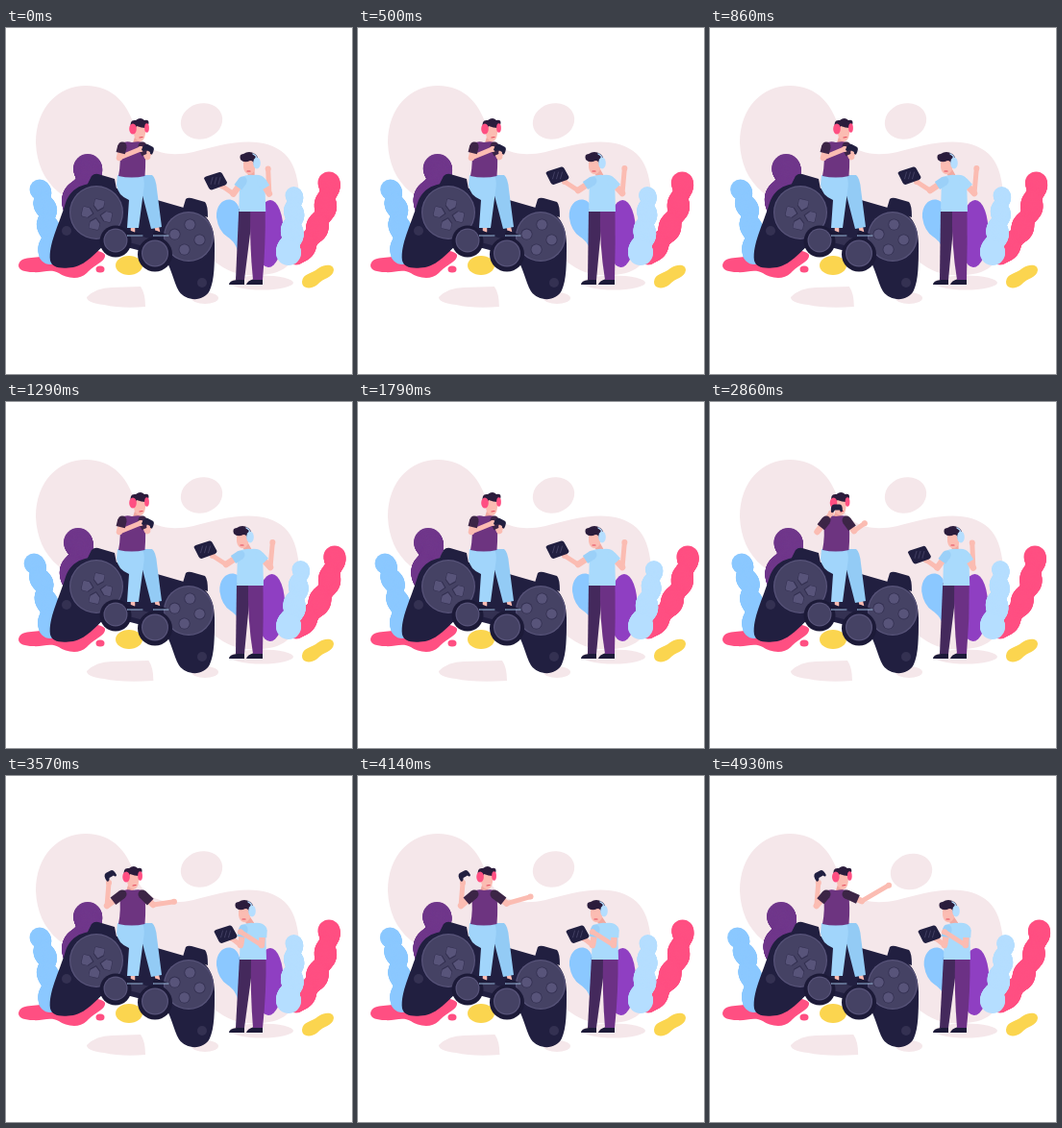
An HTML page with a canvas that plays this animation: 360x360 px, repeating every 5 s.

```html
<!DOCTYPE html>
<html lang="en">
<head>
<meta charset="utf-8">
<title>Gaming friends</title>
<style>
  html, body { margin: 0; width: 100%; height: 100%; overflow: hidden; background: #fff; }
  canvas { display: block; width: 100vmin; height: 100vmin; }
</style>
</head>
<body>
<canvas id="stage" width="360" height="360"></canvas>
<script>
const ctx = document.getElementById('stage').getContext('2d');
const LOOP = 5000, STEPS = 70, SWAY = 3500, TAU = Math.PI * 2;
const C = {
  blush: '#f5e7ea', skin: '#fbbcb2', neck: '#f2a9a0', pink: '#ff4f82', sky: '#8bc8ff',
  pale: '#b5deff', plum: '#70378b', violet: '#8f3fc2', yellow: '#fbd54f', ink: '#211f40',
  pad: '#454264', rim: '#58547a', jeans: '#a1d5fb', jeansFar: '#93cbf5', shirt: '#6d3480',
  sleeve: '#3c2546', hair: '#2b1c3c', tee: '#a9dafc', dark: '#44295c', trousers: '#6c3185',
  red: '#e4475a'
};

const mix = (a, b, k) => a + (b - a) * k;
const polar = ([x, y], r, angle) => [x + r * Math.cos(angle), y + r * Math.sin(angle)];
function ramp(t, from, to) {
  const u = Math.min(1, Math.max(0, (t - from) / (to - from)));
  return u * u * (3 - 2 * u);
}

function shape(d, color) {
  ctx.fillStyle = color;
  ctx.fill(new Path2D(d));
}
function oval(x, y, rx, ry, color, turn = 0) {
  ctx.fillStyle = color;
  ctx.beginPath();
  ctx.ellipse(x, y, rx, ry, turn, 0, TAU);
  ctx.fill();
}
function line(points, width, color, cap = 'round') {
  ctx.strokeStyle = color;
  ctx.lineWidth = width;
  ctx.lineCap = cap;
  ctx.lineJoin = 'round';
  ctx.beginPath();
  points.forEach(([x, y]) => ctx.lineTo(x, y));
  ctx.stroke();
}
function at(x, y, turn, draw) {
  ctx.save();
  ctx.translate(x, y);
  ctx.rotate(turn);
  draw();
  ctx.restore();
}

// Beaded plant: a curve from the swaying tip to a fixed base with a pulsing radius.
function stalk(tip, bend, base, { r0, r1, pulse, beads, shift, color }) {
  const n = 80;
  for (let i = 0; i <= n; i++) {
    const u = i / n, v = 1 - u, turn = u * beads * TAU;
    const [x, y] = [0, 1].map(k => tip[k] * v * v + 2 * bend[k] * u * v + base[k] * u * u);
    const r = mix(r0, r1, u) - pulse * (1 - Math.cos(turn));
    oval(x + shift * v + pulse * Math.sin(turn), y, r, r, color);
  }
}

function backdrop(t, sway) {
  shape('M31 120C31 82 55 60 83 60C112 60 126 80 133 100C143 130 167 135 195 129C225 121 266 109 290 131C308 148 306 185 305 215C303 250 285 259 250 257C222 255 208 232 170 205C130 187 82 192 55 171C39 158 32 140 31 120Z', C.blush);
  const drift = ramp(t, 4140, 4930);
  oval(203.5 + 6 * drift, 97 + 2.5 * drift, 22, 18.5, C.blush, -0.3);

  const right = 150 - 5 * sway;
  shape(`M84 280Q94 270 110 270L${right - 5} 269Q${right} 276 ${right} 290Q120 292 102 288Q84 286 84 280Z`, C.blush);
  oval(266, 265, 33, 7.5, C.blush);
  oval(207, 281, 14, 6, C.blush);

  shape('M13 247C15 236 30 241 45 236C60 230 100 228 103 236C104 243 92 246 84 255C76 263 62 260 55 255C46 250 38 255 28 254C20 254 13 252 13 247Z', C.pink);
  oval(98, 251, 4.5, 3.5, C.pink);
  oval(128, 247, 14, 10, C.yellow);
  shape('M308 264C309 255 318 256 325 250C333 245 341 246 341 252C340 260 330 260 324 267C318 272 308 272 308 264Z', C.yellow);

  const lean = 1 - sway;
  stalk([35, 168], [45, 192], [46, 234],
    { r0: 10.5, r1: 12, pulse: 1.5, beads: 3, shift: -3.5 * lean, color: C.sky });
  stalk([85, 146], [78, 165], [71, 190],
    { r0: 15, r1: 15, pulse: 3, beads: 1.2, shift: -6 * lean, color: C.plum });
  at(2 * lean, 0, 0, () =>
    shape('M219 197C218 177 237 173 242 186C248 200 246 220 242 236C240 226 237 222 230 217Q221 211 219 197Z', C.sky));
  oval(274 + lean, 214, 14.5, 35, C.violet, 0.03);
  stalk([336, 161], [334, 205], [302, 237],
    { r0: 11.5, r1: 12, pulse: 1.2, beads: 3.5, shift: 3.5 * lean, color: C.pink });
  stalk([299.5, 174], [301, 200], [294, 234],
    { r0: 9, r1: 13, pulse: 1.2, beads: 3, shift: 4.2 * lean, color: C.pale });
}

function disc(x, y, r) {
  oval(x, y, r, r, C.rim);
  oval(x, y, r - 1.2, r - 1.2, C.pad);
}

function gamepad() {
  shape('M84 164L89 154Q92 151 96 152L113 157L116 173ZM184 188L187 178Q189 176 193 177L207 181Q210 184 210 197Z', C.ink);
  shape('M46 242C44 225 55 205 62 182C69 163 85 160 102 163L185 187C206 188 217 202 217 225C217 245 217 262 212 273C206 285 188 285 180 274C174 264 172 248 164 238L106 223C96 230 85 246 70 249C55 251 48 249 46 242Z', C.ink);
  disc(94, 192, 28);
  disc(190, 217, 26);
  for (let i = 0; i < 4; i++) {
    const angle = i * TAU / 4 + 0.22;
    at(94.5, 194, angle, () => {
      shape('M-5.5 -14Q-5.5 -16 -3.5 -16H3.5Q5.5 -16 5.5 -14V-8L0 -3L-5.5 -8Z', '#343152');
      shape('M-5 -14Q-5 -15.5 -3 -15.5H4Q5 -15.5 5 -14V-9L0 -4.5L-5 -9Z', C.rim);
    });
    const [x, y] = polar([188.5, 217.5], 13.3, angle);
    oval(x, y, 6, 6, '#343152');
    oval(x, y, 5.2, 5.2, C.rim);
  }
  shape('M119 211L153 220L151 229L120 221Z', '#343152');
  for (const [x, y, r] of [[114, 222, 16.5], [155, 235.5, 18]]) {
    oval(x, y, r, r, '#1c1a38');
    disc(x, y - 1, r - 4);
  }
  oval(204, 265, 5, 5, '#343152');
  oval(63, 211, 5, 5, '#343152');
}

function limb(shoulder, elbow, hand, cloth, reach) {
  const cuff = shoulder.map((v, i) => mix(v, elbow[i], reach));
  line([shoulder, elbow], 6.5, C.skin);
  line([elbow, hand], 5, C.skin);
  line([shoulder, cuff], 9.5, cloth, 'butt');
  oval(...shoulder, 4.5, 4.5, cloth);
  oval(...hand, 3, 3, C.skin);
}

function sitter(t) {
  const cheer = ramp(t, 2430, 3290), stretch = ramp(t, 3400, 5100);

  line([[132, 204], [132, 212]], 4.5, C.skin);
  line([[156, 204], [158, 212]], 4.5, C.skin);
  for (const x of [126, 153]) {
    shape(`M${x} 216Q${x} 210 ${x + 4} 211L${x + 16} 215.5Z`, '#1c1a38');
    line([[x, 216], [x + 16, 216]], 0.8, C.pale);
  }
  shape('M132 153H152Q156 156 157 168L162 207L151 209L142 174Z', C.jeansFar);
  shape('M116 153H142Q145 160 143 170L138 208H126L128 179Q116 174 115 163Z', C.jeans);

  at(139 - 7 * cheer + 6 * stretch, 0, 0, () => {
    line([[-4, 122], [-1, 112]], 7, C.neck);
    shape('M-6 100H6L6 110Q5 118 0 118Q-6 116 -6 109Z', C.skin);
    shape('M-9 104Q-11 95 -4 96Q1 92 5 96Q11 95 9 101Q8 105 6 104Q2 104 -3 102L-6 107Z', C.hair);
    line([[0, 114], [3, 113.5]], 1.2, C.red);
    oval(-7, 105, 3.8, 5.5, C.pink);
    oval(7.5, 104, 2.4, 4.8, C.pink);
  });
  shape('M118 121Q124 117 131 119Q140 117 144 120Q146 136 144.5 154Q131 157 117 154Q120 140 118 121Z', C.shirt);

  const farElbow = [147 + 6 * cheer + 5 * stretch, 134 - 4 * stretch];
  const farHand = polar(farElbow, mix(5, 22, cheer) + 11 * stretch, -1.1 + 0.96 * cheer - 0.4 * stretch);
  limb([142, 123], farElbow, farHand, C.sleeve, 0.75);
  const elbow = [118 - 13 * cheer + 6 * stretch, 135];
  const hand = polar(elbow, 24, -0.39 - 1.1 * cheer);
  limb([121, 123], elbow, hand, C.sleeve, 0.6);
  at(...polar(hand, 8, -1.4 * cheer), 0.5 - cheer, () =>
    shape('M-6 4Q-7 -3 -3 -4H3Q6 -4 6 3Q4 5 3 2H-2Q-4 6 -6 4Z', C.ink));
}

function stander(t) {
  const give = 1 - ramp(Math.abs(t - 1430), 930, 1930);
  const fold = (1 - give) ** 3, dx = -3 * give * give;

  shape('M232 267Q232 263 240 262L248 262V267ZM250 267Q251 263 258 261H267V267Z', '#1c1a38');
  shape(`M${243 + dx} 188H${258 + dx}L248 262H239Z`, C.dark);
  shape(`M${255 + dx} 188H${270.5 + dx}Q${271 + dx} 225 267 262H257Q${254 + dx} 225 ${255 + dx} 188Z`, C.trousers);

  const hx = 248 - 2 * give + 6 * Math.sin(Math.PI * give);
  line([[256 + dx, 156], [hx + 2, 147]], 7, C.neck);
  shape(`M${244 + dx} 156Q${251 + dx} 152 ${258 + dx} 153Q${267 + dx} 152 ${270 + dx} 157L${271 + dx} 191H${243 + dx}Z`, C.tee);
  at(hx, 139, 0, () => {
    shape('M-6 -3H7L6 8Q4 14 -1 13Q-5 12 -6 6Z', C.skin);
    shape('M-9 -2Q-11 -8 -6 -8Q0 -12 6 -8Q11 -5 8 3L5 4Q5 -1 1 -1Q-5 2 -9 -2Z', C.hair);
    line([[-2, 10], [1, 10]], 1.2, C.red);
    line([[8, 0], [7, -6], [4, -8]], 1.4, C.pale);
    oval(8, 1.5, 3.8, 6, C.pale);
  });

  limb([247 + dx, 159], [244 - 15 * give, 176 - 7 * give], [235 - 20 * give, 169 - 9 * give], '#9bd0f8', 0.5);
  at(228.5 - 21 * give, 165 - 11 * give, 0, () => {
    shape('M-12 -3Q-12 -4 -10 -5L4 -9.5Q6 -10 7 -8L12 1Q12 3 10 4L-4 9Q-6 9 -7 7Z', C.ink);
    for (const x of [-3, 1, 5]) line([[x - 2, 3], [x, -4]], 0.6, C.rim);
  });
  const elbow = [275 - 9 * fold, 172 + 4 * fold];
  limb([267 + dx, 160], elbow, polar(elbow, 26, -1.48 - 1.1 * fold), C.tee, 0.5);
}

function draw(elapsed) {
  const t = Math.floor((elapsed % LOOP) * STEPS / LOOP) * LOOP / STEPS;
  const sway = Math.cos(t / SWAY * TAU);
  ctx.fillStyle = '#fff';
  ctx.fillRect(0, 0, 360, 360);
  backdrop(t, sway);
  gamepad();
  sitter(t);
  stander(t);
}

const start = performance.now();
function tick() {
  draw(performance.now() - start);
  requestAnimationFrame(tick);
}
tick();
</script>
</body>
</html>
```
